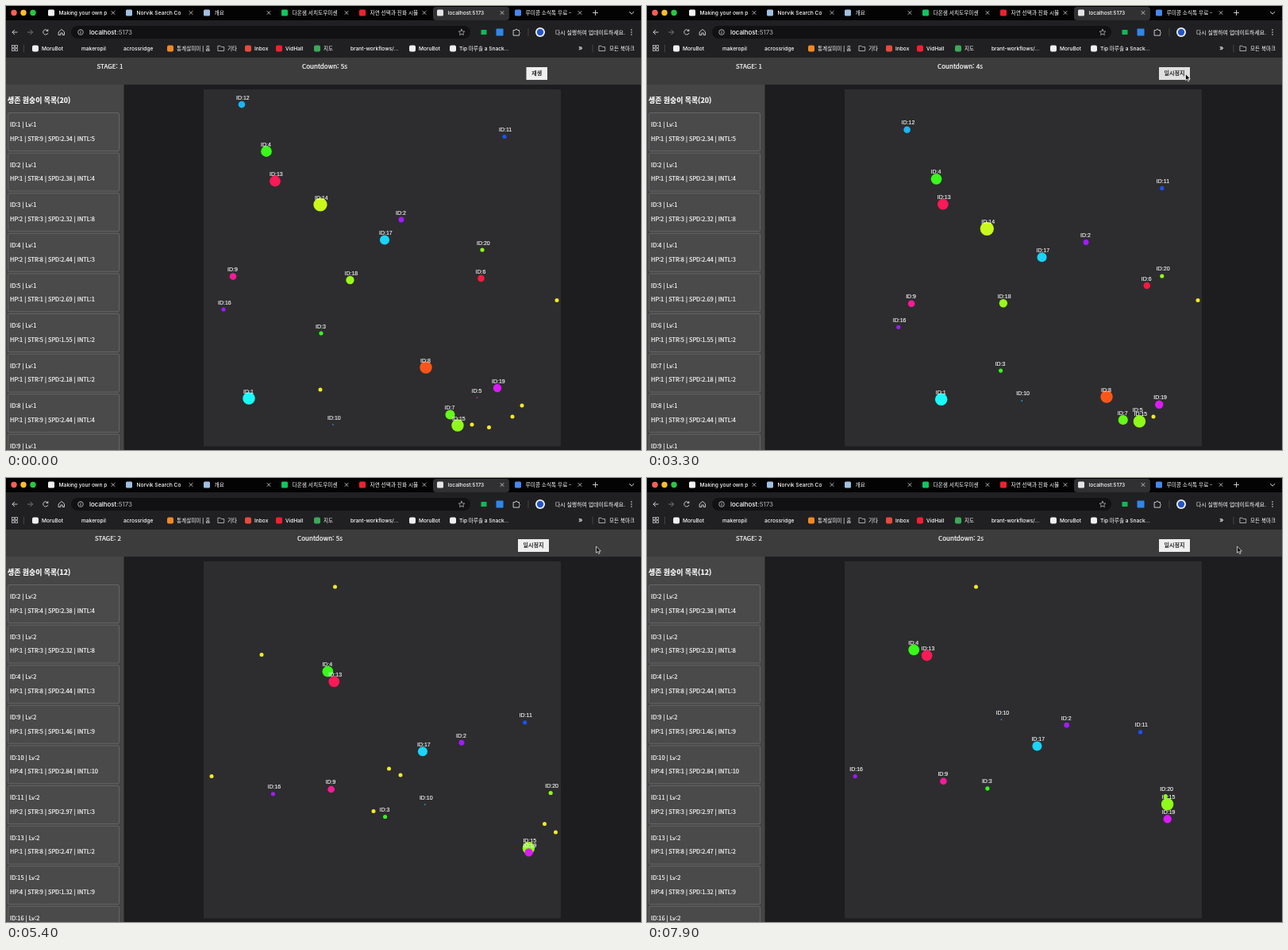
Write an HTML page that moves like this. It is 800 px wide and 559 px high and loops after 8 s.

```html
<!DOCTYPE html>
<html lang="ko">
<head>
<meta charset="utf-8">
<title>Monkey simulation</title>
<style>
  html, body { margin: 0; width: 100%; height: 100%; overflow: hidden; background: #1d1d1f; }
  svg { display: block; }
  text { fill: #fff; white-space: pre; }
  .ui { font-family: Inter, "Noto Sans CJK KR", "Noto Sans CJK", sans-serif; font-weight: 500; }
  .page { font-family: "Noto Sans CJK KR", "Noto Sans CJK", "Noto Sans", sans-serif; stroke: #fff; stroke-width: .2px; }
  .tag { font: 7px "Liberation Sans", Arial, sans-serif; stroke: #fff; stroke-width: .12px; }
  .dark { fill: #111; stroke: #111; }
</style>
</head>
<body>
<svg id="stage" width="800" height="559" viewBox="0 0 800 559"></svg>
<script>
const LOOP = 8000, STEP = 100, TICK = 10, PLAY = 1750;
const stage = document.getElementById('stage');

function add(parent, tag, attrs, content) {
  const el = document.createElementNS('http://www.w3.org/2000/svg', tag);
  for (const key in attrs) el.setAttribute(key, attrs[key]);
  if (content !== undefined) el.textContent = content;
  parent.append(el);
  return el;
}
const rect = (x, y, width, height, fill, more = {}) =>
  add(stage, 'rect', { x, y, width, height, fill, ...more });
const dot = (cx, cy, r, fill, parent = stage) => add(parent, 'circle', { cx, cy, r, fill });
const line = (d, stroke = '#c8c8ca', width = 1) =>
  add(stage, 'path', { d, stroke, fill: 'none', 'stroke-width': width, 'stroke-linecap': 'round', 'stroke-linejoin': 'round' });
const label = (x, y, size, content, cls = 'ui', parent = stage, more = {}) =>
  add(parent, 'text', { x, y, 'font-size': size, class: cls, ...more }, content);
const folder = x => line(`M${x - 3.7} 50.3h2.8l1 1.2h3.6v5h-7.4z`, '#c8c8ca', .8);
const show = (el, on) => el.setAttribute('visibility', on ? 'visible' : 'hidden');
const place = (el, x, y) => el.setAttribute('transform', `translate(${x} ${y})`);
const progress = (t, from, to) => Math.min(1, Math.max(0, (t - from) / (to - from)));

// Browser window
function drawTabs() {
  rect(0, 0, 800, 18, '#030304');
  ['#ff5f57', '#febc2e', '#28c840'].forEach((c, i) => dot(10 + i * 12, 8.5, 3.7, c));
  rect(538, 1, 96, 17, '#303032', { rx: 4 });
  const tabs = [
    ['Making your own p', '#f2f2f2'], ['Norvik Search Co', '#9fc0e0'], ['개요', '#9fc0e0'],
    ['다온샘 서치도우미센', '#10c660'], ['자연 선택과 진화 시뮬', '#f02030'],
    ['localhost:5173', '#e4e4e4'], ['루미콩 소식톡 무료 -', '#4a86ee']
  ];
  tabs.forEach(([title, color], i) => {
    const x = 53 + i * 98;
    rect(x, 4.5, 8, 8, color, { rx: 1.5 });
    const clip = add(stage, 'svg', { x: x + 13.5, y: 0, width: 66, height: 18 });
    label(0, 11, 6.7, title, 'ui', clip);
    line(`M${x + 80} 6.5l4 4m0 -4l-4 4`, '#dedee0', .8);
  });
  line('M739.5 8.5h6m-3 -3v6', '#dedee0', .9);
  line('M785.5 7.5l2.7 2.5l2.7 -2.5', '#dedee0', 1);
}

function drawToolbar() {
  rect(0, 18, 800, 47, '#202022');
  rect(82, 25, 503, 16, '#111113', { rx: 8 });
  line('M14 33h-6m2.7 -2.8l-2.7 2.8l2.7 2.8');
  line('M27.5 33h6m-2.7 -2.8l2.7 2.8l-2.7 2.8', '#77777a');
  line('M52.7 31.2a3.2 3.2 0 1 0 .2 3m-.1 -4.5v1.8h-1.8');
  line('M66.5 32.5l3.5 -3l3.5 3v4h-2.3v-2.5h-2.4v2.5h-2.3z');
  add(stage, 'circle', { cx: 94, cy: 33, r: 3.3, fill: 'none', stroke: '#d0d0d2', 'stroke-width': .8 });
  line('M94 32.5v2m0 -3.4v.1', '#d0d0d2', .8);
  const url = label(105, 35.8, 7.9, '');
  add(url, 'tspan', {}, 'localhost');
  add(url, 'tspan', { fill: '#a0a0a4' }, ':5173');
  line('M574 29.3l1.1 2.5l2.7 .3l-2 1.8l.6 2.7l-2.4 -1.4l-2.4 1.4l.6 -2.7l-2 -1.8l2.7 -.3z', '#c8c8ca', .7);
  rect(598.5, 30, 7, 6, '#12b858');
  rect(617.5, 28.5, 9, 9, '#2f87e8', { rx: 1 });
  line('M639.5 30.5h2.2a1.3 1.3 0 0 1 2.6 0h2.2v2.2a1.3 1.3 0 0 1 0 2.4v2h-7z');
  line('M658 28.5v9', '#555558', .7);
  dot(673, 33, 6, '#f0f2f8');
  dot(673, 33, 4.2, '#2456c8');
  label(692, 35.5, 6.9, '다시 실행하여 업데이트하세요.');
  [30, 33, 36].forEach(y => dot(788, y, .8, '#e0e0e2'));
}

function drawBookmarks() {
  for (let i = 0; i < 4; i++)
    rect(7.5 + (i % 2) * 4.2, 49.5 + (i >> 1) * 4.2, 2.8, 2.8, 'none', { stroke: '#c8c8ca', 'stroke-width': .8 });
  line('M22.5 49v9', '#555558', .7);
  const marks = [
    [45, 'MoruBot', '#f0f0f0'], [95, 'makeropil'], [148, 'acrossridge'],
    [215, '통계살피미 | 홈', '#f08a20'], [313, 'Inbox', '#e84a3c'], [352, 'VidHall', '#f02030'],
    [400, '지도', '#3ca85a'], [434, 'brant-workflows/...'], [520, 'MoruBot', '#f0f0f0'],
    [571, 'Tip 마루솔 a Snack...', '#f0f0f0']
  ];
  for (const [x, title, color] of marks) {
    if (color) rect(x - 12, 49.5, 8, 8, color, { rx: 2 });
    label(x, 55.6, 6.6, title);
  }
  folder(271);
  label(279, 55.6, 6.6, '기타');
  label(721, 56, 9, '»');
  line('M739 49v9', '#555558', .7);
  folder(751);
  label(760, 55.6, 6.6, '모든 북마크');
}

drawTabs();
drawToolbar();
drawBookmarks();

// Page
rect(0, 65, 800, 34, '#3c3c3d');
rect(0, 99, 148.5, 460, '#464647');
rect(249, 105, 450, 449.5, '#2d2d2f');
const stageText = label(0, 78.6, 8, '', 'page');
const countText = label(0, 78.6, 8.1, '', 'page');
const button = rect(0, 77, 0, 16, '#efefef');
const buttonText = label(0, 87.4, 7, '', 'page dark', stage, { 'text-anchor': 'middle' });

// Food of both stages
const food = (x, y) => ({ x, y, el: dot(x, y, 2.5, '#f2ea26') });
const meals = [
  [food(396, 483), food(587, 527), food(608.5, 530.5), food(638, 517), food(650, 503), food(694, 370.5)],
  [food(414.5, 137), food(322, 222.5), food(259, 375.5), food(482.5, 366), food(497, 374),
    food(463, 419.5), food(678.5, 435.5), food(692.5, 446), food(431, 258), food(530, 343)]
];

// Strength sets the size; speed is in pixels per second
const monkeys = [];
function monkey(x, y, str, speed, hue) {
  const id = monkeys.length + 1, r = str * .86;
  const el = add(stage, 'g', {});
  dot(0, 0, r, `hsl(${hue}, 95%, 54%)`, el);
  label(-7, -6.5, 7, 'ID:' + id, 'tag', el);
  monkeys.push({ id, x, y, r, str, speed, el });
}
monkey(306, 494, 9, 42, 180);
monkey(498, 269, 4, 40, 277);
monkey(397, 412, 3, 53, 113);
monkey(328, 183, 8, 36, 112);
monkey(593.5, 493, 1, 29, 295);
monkey(598.5, 343, 5, 21, 350);
monkey(559.5, 514.5, 7, 27, 100);
monkey(529, 455, 9, 41, 16);
monkey(286, 340.5, 5, 38.5, 326);
monkey(412, 527, 1, 78, 202);
monkey(628, 164.5, 3, 44, 225);
monkey(297, 124, 5, 30.5, 198);
monkey(339, 220.5, 8, 32.4, 344);
monkey(396, 250, 10, 34.5, 73);
monkey(569, 528, 9, 34, 88);
monkey(274, 382, 3, 31.5, 276);
monkey(477, 294.5, 7, 28, 190);
monkey(433.5, 345, 6, 25, 86);
monkey(619, 481, 6, 22.5, 292);
monkey(600, 307, 3, 38, 88);
const starved = [1, 5, 6, 7, 8, 12, 14, 18];

// Sidebar: health, listed speed, intelligence
const traits = {
  1: [1, '2.34', 5], 2: [1, '2.38', 4], 3: [2, '2.32', 8], 4: [2, '2.44', 3],
  5: [1, '2.69', 1], 6: [1, '1.55', 2], 7: [1, '2.18', 2], 8: [1, '2.44', 4],
  9: [1, '1.46', 9], 10: [5, '2.84', 10], 11: [3, '2.97', 3], 13: [1, '2.47', 2],
  15: [5, '1.32', 9], 16: [1, '2.41', 6]
};
function sidebar(level, group) {
  const g = add(stage, 'g', {});
  label(2, 121.7, 8.9, `생존 원숭이 목록(${group.length})`, 'page', g, { 'font-weight': 700 });
  group.slice(0, 9).forEach(({ id, str }, i) => {
    const y = 134.5 + i * 50.6;
    const [hp, spd, intl] = traits[id];
    const health = Math.max(1, hp + 1 - level);
    add(g, 'rect', { x: 2.5, y, width: 140, height: 48, rx: 1.5, fill: '#4a4a4b', stroke: '#727274', 'stroke-width': .7 });
    label(5, y + 17.6, 7.4, `ID:${id} | Lv:${level}`, 'page', g);
    label(5, y + 35.2, 7.4, `HP:${health} | STR:${str} | SPD:${spd} | INTL:${intl}`, 'page', g);
  });
  return g;
}
const groups = [monkeys, monkeys.filter(m => !starved.includes(m.id))];
const lists = groups.map((group, i) => sidebar(i + 1, group));

// Every monkey heads for the nearest food; the stage ends when all is eaten
function simulate() {
  const snapshots = [];
  let round = 0, began = PLAY, left = [...meals[0]];
  for (let t = 0; t < LOOP; t += TICK) {
    if (t % STEP === 0) {
      const count = 5 - Math.max(0, Math.floor((t - began) / 1000));
      snapshots.push({ round, count, left: [...left], spots: monkeys.map(m => [m.x, m.y]) });
    }
    if (t < PLAY) continue;
    for (const m of groups[round]) {
      const away = f => Math.hypot(f.x - m.x, f.y - m.y);
      const goal = left.reduce((a, b) => away(b) < away(a) ? b : a);
      const stride = m.speed * TICK / 1000 / away(goal);
      m.x += (goal.x - m.x) * stride;
      m.y += (goal.y - m.y) * stride;
      if (away(goal) < Math.max(3, m.r)) left = left.filter(f => f !== goal);
      if (!left.length) break;
    }
    if (!left.length) {
      round = 1;
      began = t;
      left = [...meals[1]];
    }
  }
  return snapshots;
}
const snapshots = simulate();

const cursor = add(stage, 'path', {
  d: 'M0 0v8.2l1.9 -1.7l1.3 2.9l1.4 -.6l-1.3 -2.8h2.5z',
  fill: '#050505', stroke: '#fff', 'stroke-width': .7
});

function render(step) {
  const t = step * STEP, playing = t >= PLAY;
  const { round, count, left, spots } = snapshots[step];

  stageText.textContent = 'STAGE: ' + (round + 1);
  stageText.setAttribute('x', playing ? 112 : 114.5);
  countText.textContent = `Countdown: ${count}s`;
  countText.setAttribute('x', playing ? 366 + round : 373);
  lists.forEach((list, i) => show(list, i === round));

  const width = playing ? 39 : 26.5, x = playing ? 645 : 655.5;
  button.setAttribute('x', x);
  button.setAttribute('width', width);
  button.setAttribute('fill', playing && t < 3700 ? '#e0e0e0' : '#efefef');
  buttonText.setAttribute('x', x + width / 2);
  buttonText.textContent = playing ? '일시정지' : '재생';

  meals.flat().forEach(f => show(f.el, left.includes(f)));
  monkeys.forEach((m, i) => {
    show(m.el, groups[round].includes(m));
    place(m.el, ...spots[i]);
  });

  const enter = progress(t, 1100, 1500), leave = progress(t, 3600, 4000);
  show(cursor, t >= 1100);
  place(cursor, 778 - 99.5 * enter + 65 * leave, 108 - 22.5 * enter + .5 * leave);
}

const opened = performance.now();
function tick() {
  render(Math.floor((performance.now() - opened) % LOOP / STEP));
  requestAnimationFrame(tick);
}
tick();
</script>
</body>
</html>
```
